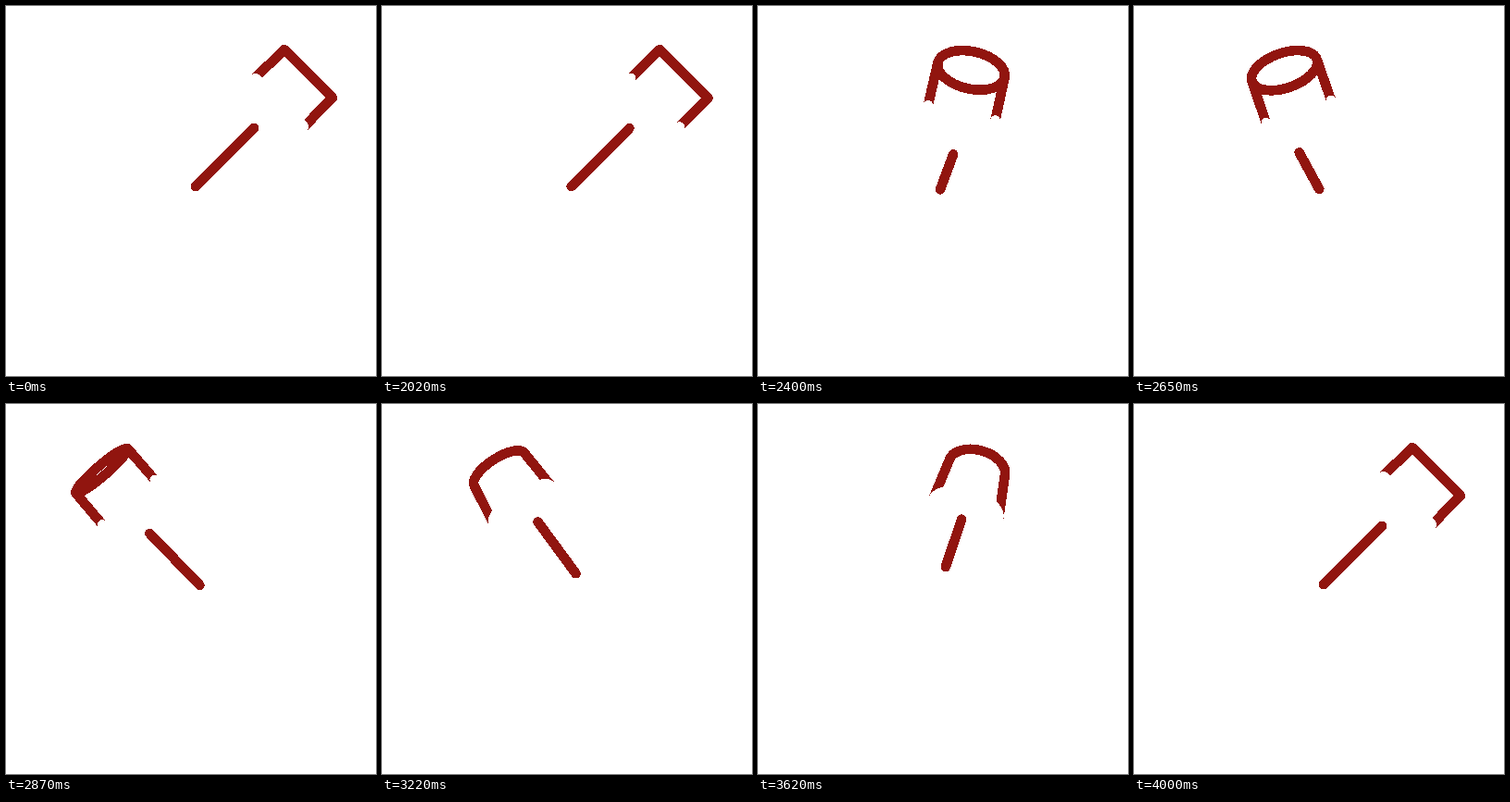
Recreate the animation shown at these times as an HTML page. Size 400 px wide and 400 px high, loop 4020 ms.

```html
<!DOCTYPE html>
<html lang="en">
<head>
<meta charset="utf-8">
<title>Turning cup</title>
<style>
  html, body { margin: 0; width: 100%; height: 100%; overflow: hidden; background: #fff; }
  svg { display: block; width: 100vw; height: 100vh; }
  path { fill: none; stroke: #91150f; stroke-width: 10.6; stroke-linejoin: round; shape-rendering: crispEdges; }
  #rim, #rod, #base { stroke-linecap: round; }
  #base { stroke: #fff; }
</style>
</head>
<body>
<svg viewBox="-200 -200 400 400">
  <path id="sides"/>
  <path id="rim"/>
  <path id="base"/>
  <path id="rod"/>
</svg>
<script>
const LOOP = 4020, START = 2000, TURN = 2000;
const RADIUS = 37, BASE_RADIUS = 37.2, HEIGHT = 43.8, REACH = 126.8, ROD = 63;

const [sides, rim, base, rod] = document.querySelectorAll("path");
const at = ({ x, y }) => `${x.toFixed(2)} ${y.toFixed(2)}`;

// The ends of a disc's long axis, square to the leaning cup.
function discEnds(x, y, radius, lean) {
  const dx = radius * Math.cos(lean), dy = radius * Math.sin(lean);
  return [{ x: x - dx, y: y - dy }, { x: x + dx, y: y + dy }];
}

function arcTo(end, radius, depth, lean) {
  return `A${radius} ${Math.abs(depth)} ${lean * 180 / Math.PI} 0 1 ${at(end)}`;
}

function halfRing([left, right], radius, depth, lean) {
  return `M${at(left)}${arcTo(right, radius, depth, lean)}`;
}

function fullRing(ends, radius, depth, lean) {
  return halfRing(ends, radius, depth, lean) + arcTo(ends[0], radius, depth, lean) + "Z";
}

function draw(time) {
  const turn = Math.min(1, Math.max(0, (time - START) / TURN)) * 2 * Math.PI;
  // The turn passes quickly through the wide poses and slowly through the upright ones.
  const phase = Math.atan2(1.4 * Math.sin(turn), Math.cos(turn));
  const c = Math.cos(phase), s = Math.sin(phase);
  const tilt = s * Math.abs(s), tiltSize = s * s;
  const facingAway = tilt <= 0;

  const lean = Math.atan(c);
  const depth = 21.5 * tilt;
  const radius = RADIUS + 6 * Math.min(0, s);
  const height = HEIGHT + 3.5 * tiltSize;

  const rimX = REACH * c + 14 * ((1 - c) / 2) ** 2;
  const rimY = -REACH - 4 * tiltSize;
  const baseX = rimX - height * Math.sin(lean);
  const baseY = rimY + height * Math.cos(lean);
  const rimEnds = discEnds(rimX, rimY, radius, lean);
  const baseEnds = discEnds(baseX, baseY, BASE_RADIUS, lean);

  const foot = {
    x: 0.5 - 4.5 * c + 9 * c * c - 3 * s,
    y: -5 - 8.5 * tiltSize + 12 * tilt
  };
  const tip = {
    x: foot.x + ROD * c,
    y: -5 - ROD + 11 * tiltSize + 18.9 * tilt
  };

  sides.setAttribute("d", rimEnds.map((end, i) => `M${at(end)}L${at(baseEnds[i])}`).join(""));
  rim.setAttribute("d", (facingAway ? halfRing : fullRing)(rimEnds, radius, depth, lean));
  base.setAttribute("d", facingAway
    ? fullRing(baseEnds, BASE_RADIUS, depth, lean)
    : baseEnds.map(end => `M${at(end)}h.01`).join(""));
  base.style.fill = facingAway ? "#fff" : "none";
  rod.setAttribute("d", `M${at(tip)}L${at(foot)}`);
}

const began = performance.now();
function tick() {
  draw((performance.now() - began) % LOOP);
  requestAnimationFrame(tick);
}
tick();
</script>
</body>
</html>
```
